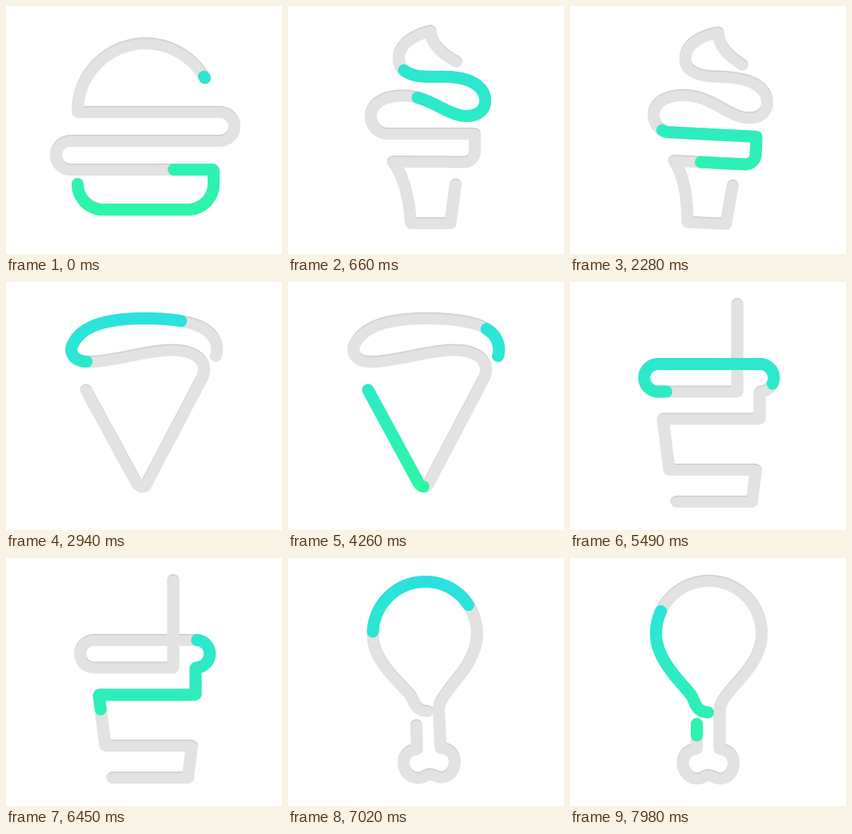
These frames come from a looping animation (345 px wide and 310 px high, 8000 ms). An HTML page with a canvas:

```html
<!DOCTYPE html>
<html lang="en">
<head>
<meta charset="utf-8">
<title>Fast food line</title>
<style>
  html, body { margin: 0; width: 100%; height: 100%; overflow: hidden; background: #fff; }
  canvas { display: block; }
</style>
</head>
<body>
<canvas id="stage" width="345" height="310"></canvas>
<script>
const LOOP = 8000;
const HOLD = 2200;        // time from one morph to the next
const FIRST_MORPH = 2;
const MORPH = 487;
const LAP = 4500;         // time for the coloured part to run the whole line
const HEAD_START = 0.248;
const TRAIL = 0.25;
const SAMPLES = 480;
const CENTER = { x: 174, y: 151 };

const outlines = {
  burger: `M89.5 222.5 A32 32 0 0 0 121.5 254.5 H227.5 A32 32 0 0 0 259.5 222.5 V204.5
    H80.5 A18 18 0 0 1 80.5 168.5 H267.5 A18 18 0 0 0 267.5 132.5 H89.5
    A85 85 0 0 1 248.5 90`,
  iceCream: `M210.5 69.5 C190 58 179 46 178 31 C150 38 138.5 52 138.5 65
    C138.5 73 141 78 145 80.5 C162 93 185 86 210 89.5 C232 92 246.5 103 246.5 118.5
    C246.5 131 236 137.5 224 137.5 C198 137.5 178 112 143 112
    C118 112 103.5 123 103.5 138 C103.5 150 113 159.5 124 159.5
    H233.5 V182 A13 13 0 0 1 220.5 195 L131 194.5
    C143 210 151 236 153.5 271.5 H203 L209.5 223`,
  pizza: `M100 135 L162 249 C165 256 171 257 174 255 L244 122
    C250 112 248 101 240 94 C222 79 185 86 152 93 C125 98 108 101 97 99
    C82 97 79 85 84 77 C95 55 125 45.5 174 45.5 C215 45.5 240 52 250 60
    C261 67 266 80 262.5 92.5`,
  soda: `M209 27.5 V137 H110 A17.25 17.25 0 0 1 110 102.5 H238
    A17.25 17.25 0 0 1 237 137 V171 H116 L124 234.5 H232.5 L227.5 274.5 H133`,
  drumstick: `M158.5 207.5 V238.5 C147 239 141 247 141 257 C141 268 151 277 161 275.5
    C166 275 168 271.5 173 271.5 C178 271.5 181 275 186 275.5
    C196 277 204.5 268 204.5 257 C204.5 247 198 239 187 238.5 V193
    C187 181 193 175 200 166 C212 150 239.5 128 239.5 94.5
    A66 66 0 0 0 107.5 94.5 C107.5 128 140 156 151 171 C157 179 156 192 172.5 193`
};

const shapes = Object.values(outlines).map(samplePath);
const ctx = document.getElementById('stage').getContext('2d');
const tint = ctx.createLinearGradient(0, 20, 0, 280);
tint.addColorStop(0, 'rgb(42,224,226)');
tint.addColorStop(1, 'rgb(46,248,160)');

function samplePath(d) {
  const path = document.createElementNS('http://www.w3.org/2000/svg', 'path');
  path.setAttribute('d', d);
  const length = path.getTotalLength();
  return Array.from({ length: SAMPLES + 1 }, (_, i) => {
    const { x, y } = path.getPointAtLength(length * i / SAMPLES);
    return { x, y };
  });
}

const mix = (a, b, k) => a + (b - a) * k;
const easeInOut = u => u < 0.5 ? 4 * u ** 3 : 1 - 4 * (1 - u) ** 3;

// The line makes half a turn while it bends into the upside-down next shape.
function poseAt(time) {
  const index = Math.max(0, Math.floor((time - FIRST_MORPH) / HOLD));
  const u = Math.min(1, Math.max(0, (time - FIRST_MORPH - index * HOLD) / MORPH));
  const from = shapes[index], to = shapes[index + 1];
  if (u === 0) return from;
  if (u === 1) return to;
  const k = easeInOut(u);
  const cos = Math.cos(Math.PI * k), sin = Math.sin(Math.PI * k);
  return from.map((p, i) => {
    const x = mix(p.x - CENTER.x, CENTER.x - to[i].x, k);
    const y = mix(p.y - CENTER.y, CENTER.y - to[i].y, k);
    return { x: CENTER.x + x * cos - y * sin, y: CENTER.y + x * sin + y * cos };
  });
}

function pointAt(points, fraction) {
  const place = fraction * SAMPLES;
  const i = Math.min(SAMPLES - 1, Math.floor(place));
  const a = points[i], b = points[i + 1];
  return [mix(a.x, b.x, place - i), mix(a.y, b.y, place - i)];
}

function linePart(points, start, end) {
  const line = new Path2D();
  line.moveTo(...pointAt(points, start));
  for (let i = Math.floor(start * SAMPLES) + 1; i < end * SAMPLES; i++) {
    line.lineTo(points[i].x, points[i].y);
  }
  line.lineTo(...pointAt(points, end));
  return line;
}

function stroke(line, style, dy = 0) {
  ctx.save();
  ctx.translate(0, dy);
  ctx.strokeStyle = style;
  ctx.stroke(line);
  ctx.restore();
}

function draw(time) {
  const points = poseAt(time);
  ctx.clearRect(0, 0, 345, 310);
  ctx.lineWidth = 15;
  ctx.lineCap = ctx.lineJoin = 'round';

  // Grey groove with a soft shade along its upper edge
  const whole = linePart(points, 0, 1);
  stroke(whole, '#cbcbcb');
  ctx.globalCompositeOperation = 'source-atop';
  stroke(whole, '#d8d8d8', 1);
  stroke(whole, '#e2e2e2', 2);
  ctx.globalCompositeOperation = 'source-over';

  const head = (HEAD_START + time / LAP) % 1;
  const tail = head - TRAIL;
  stroke(linePart(points, Math.max(0, tail), head), tint);
  if (tail < 0) stroke(linePart(points, 1 + tail, 1), tint);
}

function tick() {
  draw(performance.now() % LOOP);
  requestAnimationFrame(tick);
}
tick();
</script>
</body>
</html>
```
